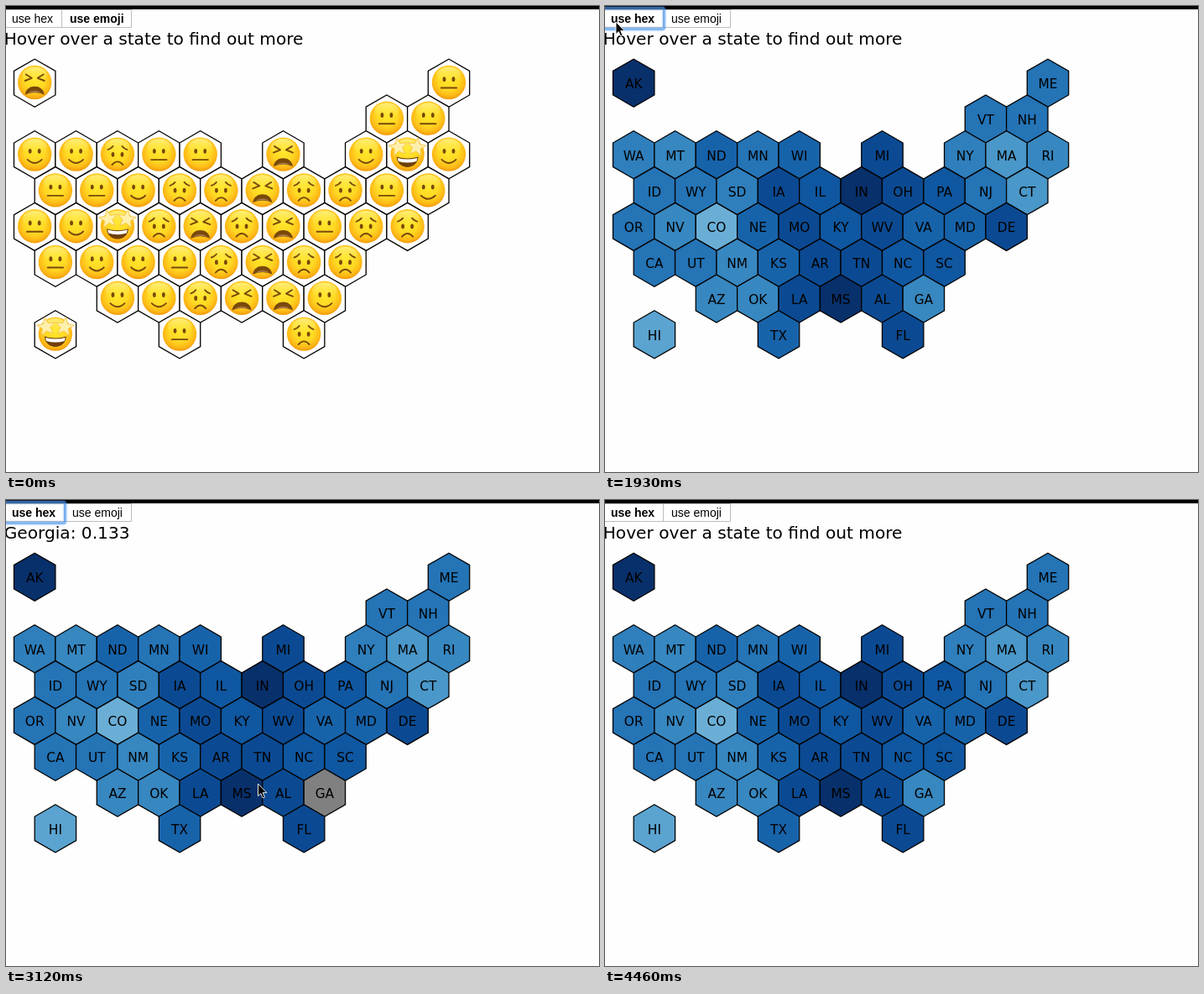
An HTML page that plays this animation: 707 px wide and 555 px high, repeating every 4560 ms.

```html
<!DOCTYPE html>
<html lang="en">
<head>
<meta charset="utf-8">
<title>State hex map</title>
<style>
  html, body { margin: 0; width: 100%; height: 100%; overflow: hidden; background: #fefefe; }
  svg { display: block; }
  .button { font: 14px "Liberation Sans", Arial, sans-serif; }
  .on { font-weight: bold; }
  #info { font: 20.15px "DejaVu Sans", Verdana, sans-serif; }
  #labels { font: 15.4px "DejaVu Sans", Verdana, sans-serif; text-anchor: middle; }
  .line { fill: none; stroke: #79490a; stroke-width: 1.9; stroke-linecap: round; stroke-linejoin: round; }
  .dark { fill: #79490a; }
</style>
</head>
<body>
<svg width="707" height="555" viewBox="0 0 707 555">
  <defs>
    <radialGradient id="skin" cy=".42" r=".6">
      <stop offset="0" stop-color="#ffe629"/>
      <stop offset=".5" stop-color="#ffd924"/>
      <stop offset=".8" stop-color="#fdb916"/>
      <stop offset="1" stop-color="#ee940a"/>
    </radialGradient>
    <linearGradient id="shine" x2="0" y2="1">
      <stop offset="0" stop-color="#fff79a" stop-opacity=".75"/>
      <stop offset="1" stop-color="#fff04a" stop-opacity="0"/>
    </linearGradient>
    <g id="head">
      <circle r="20.2" fill="url(#skin)"/>
      <ellipse cy="-9" rx="14.5" ry="9.5" fill="url(#shine)"/>
    </g>
    <g id="eyes" class="dark">
      <ellipse cx="-5.5" cy="-3.8" rx="1.9" ry="2.9"/>
      <ellipse cx="5.5" cy="-3.8" rx="1.9" ry="2.9"/>
    </g>
    <g id="N"><use href="#head"/><use href="#eyes"/><path class="line" d="M-9.2 6.5H9.2"/></g>
    <g id="S"><use href="#head"/><use href="#eyes"/><path class="line" d="M-8.5 6.3Q0 14.5 8.5 6.3"/></g>
    <g id="W">
      <use href="#head"/><use href="#eyes" y="4"/>
      <path class="line" d="M-11.5 -5.5Q-8 -6.5 -5.5 -9.5M11.5 -5.5Q8 -6.5 5.5 -9.5M-6.5 12.5Q0 5 6.5 12.5"/>
    </g>
    <g id="T">
      <use href="#head"/>
      <path class="line" d="M-10.5 -9.5L-3.5 -5.2L-11.5 -2M10.5 -9.5L3.5 -5.2L11.5 -2"/>
      <path class="dark" d="M-11.5 14.5C-10 1.5 10 1.5 11.5 14.5Q0 9.5 -11.5 14.5Z"/>
      <path d="M-9 13.2Q0 6.5 9 13.2Q0 10 -9 13.2Z" fill="#a87a50"/>
    </g>
    <path id="star" d="M0 -11.5L3 -4L11 -3.6L4.8 1.4L7 9.3L0 4.9L-7 9.3L-4.8 1.4L-11 -3.6L-3 -4Z"
      fill="#fff0ad" stroke="#f3c244" stroke-width=".8" stroke-linejoin="round"/>
    <g id="H">
      <use href="#head"/>
      <path d="M-13 3Q0 7 13 3C12 19.5 -12 19.5 -13 3Z" fill="#70400c"/>
      <path d="M-11.8 4.3Q0 7.6 11.8 4.3L10.8 8.4Q0 11.5 -10.8 8.4Z" fill="#fff"/>
      <use href="#star" transform="translate(-11 -8.5) rotate(-9)"/>
      <use href="#star" transform="translate(11 -8.5) rotate(9)"/>
    </g>
  </defs>

  <rect width="707" height="4" fill="#000"/>
  <path id="frames" fill="#fff" stroke="#bdbdbd"/>
  <text id="info" x="-2.3" y="46"></text>
  <text id="hexButton" class="button" x="7" y="20">use hex</text>
  <text id="emojiButton" class="button" y="20">use emoji</text>
  <g id="ring" fill="none" stroke="#4b98ee">
    <rect x="-9" y="2.5" height="25" rx="2" stroke-width="3" stroke-opacity=".6"/>
    <rect x="-9" y="2.5" height="25" rx="3" stroke-width="6" stroke-opacity=".2"/>
  </g>
  <g id="hexes" stroke="#000" stroke-width="1.3"></g>
  <g id="faces"></g>
  <g id="labels"></g>
  <path id="cursor" d="M0 0V14.6L3.3 11.5L5.6 16.8L8 15.8L5.7 10.6H10.3Z" stroke="#fff" stroke-width=".9"/>
</svg>
<script>
const $ = id => document.getElementById(id);
const LOOP = 4560, PRESS = 1630, SWITCH = 1930, BLUR = 4460;
const PROMPT = 'Hover over a state to find out more';

// Each cell: state, shade, face. A dash leaves a gap.
const ROWS = [
  'AK0T - - - - - - - - - ME4N',
  '- - - - - - - - VT4N NH4N',
  'WA5S MT6S ND3W MN4N WI3N - MI1T - NY5S MA7H RI6S',
  'ID4N WY4N SD5S IA1W IL2W IN0T OH1W PA2W NJ4N CT7S',
  'OR4N NV6S CO9H NE3W MO1T KY2W WV1T VA3N MD3W DE1W',
  'CA4N UT4S NM6S KS3N AR1W TN1T NC2W SC2W',
  '- - AZ6S OK6S LA1W MS0T AL1T GA6S',
  'HI8H - - TX3N - - FL1W'
];
const SHADES = ['#08306b', '#0b4a92', '#0f57a0', '#1763aa', '#2474b6',
  '#2f7fbc', '#3787c0', '#4a97c9', '#5ba3d0', '#6aaed6'];
const INFO = {
  NE: 'Nebraska: 0.163', TN: 'Tennessee: 0.175', NC: 'North Carolina: 0.169',
  SC: 'South Carolina: 0.168', GA: 'Georgia: 0.133', MS: 'Mississippi: 0.191',
  AL: 'Alabama: 0.176'
};

// Pointer stops: time, x, y, hovered state.
const STOPS = [
  [150, 7, 19], [300, 62, 48], [440, 145, 92], [590, 240, 140], [740, 335, 184],
  [890, 420, 220], [1030, 484, 243], [1180, 516, 252], [1330, 270, 140], [1480, 40, 30], [1630, 13, 19],
  [2230, 42, 50], [2380, 118, 138], [2530, 212, 250, 'NE'], [2670, 318, 302, 'TN'], [2820, 379, 277, 'NC'],
  [2970, 394, 322, 'SC'], [3120, 300.5, 338, 'GA'], [3270, 290, 344, 'MS'], [3420, 338, 355, 'AL'],
  [3570, 404, 428], [3710, 433, 464], [4010, 574, 540], [4160, -50, 0]
];

function add(parent, tag, attrs, text = '') {
  const node = document.createElementNS('http://www.w3.org/2000/svg', tag);
  for (const key in attrs) node.setAttribute(key, attrs[key]);
  node.textContent = text;
  $(parent).append(node);
  return node;
}

const show = (id, visible) => { $(id).style.display = visible ? '' : 'none'; };

const cells = [];
ROWS.forEach((row, r) => row.split(' ').forEach((cell, c) => {
  if (cell === '-') return;
  const name = cell.slice(0, 2), shade = SHADES[cell[2]];
  const x = 34.2 + 49.38 * (c + r % 2 / 2), y = 91.7 + 42.8 * r;
  const at = `translate(${x} ${y})`;
  const hex = add('hexes', 'path', { transform: at, d: 'M0-28.5L24.7-14.25V14.25L0 28.5L-24.7 14.25V-14.25Z' });
  add('faces', 'use', { href: '#' + cell[3], x, y: y - .7 });
  add('labels', 'text', { x, y: y + 6.4 }, name);
  cells.push({ name, shade, hex });
}));

function draw(t) {
  const hexMode = t >= SWITCH;
  const split = hexMode ? 69.5 : 66.5;
  const [, x, y, hovered] = STOPS.findLast(stop => stop[0] <= t) || [0, -50, 0];

  for (const { name, shade, hex } of cells)
    hex.setAttribute('fill', name === hovered ? '#808080' : hexMode ? shade : '#fff');
  show('faces', !hexMode);
  show('labels', hexMode);
  show('ring', t >= PRESS && t < BLUR);

  $('info').textContent = INFO[hovered] || PROMPT;
  $('frames').setAttribute('d', `M-2 4.5H149.5V25.5H-2ZM${split} 4V25`);
  $('hexButton').classList.toggle('on', hexMode);
  $('emojiButton').classList.toggle('on', !hexMode);
  $('emojiButton').setAttribute('x', split + 9.5);
  for (const rect of $('ring').children) rect.setAttribute('width', split + 10);
  $('cursor').setAttribute('transform', `translate(${x} ${y})`);
}

function tick() {
  draw(performance.now() % LOOP);
  requestAnimationFrame(tick);
}
tick();
</script>
</body>
</html>
```
